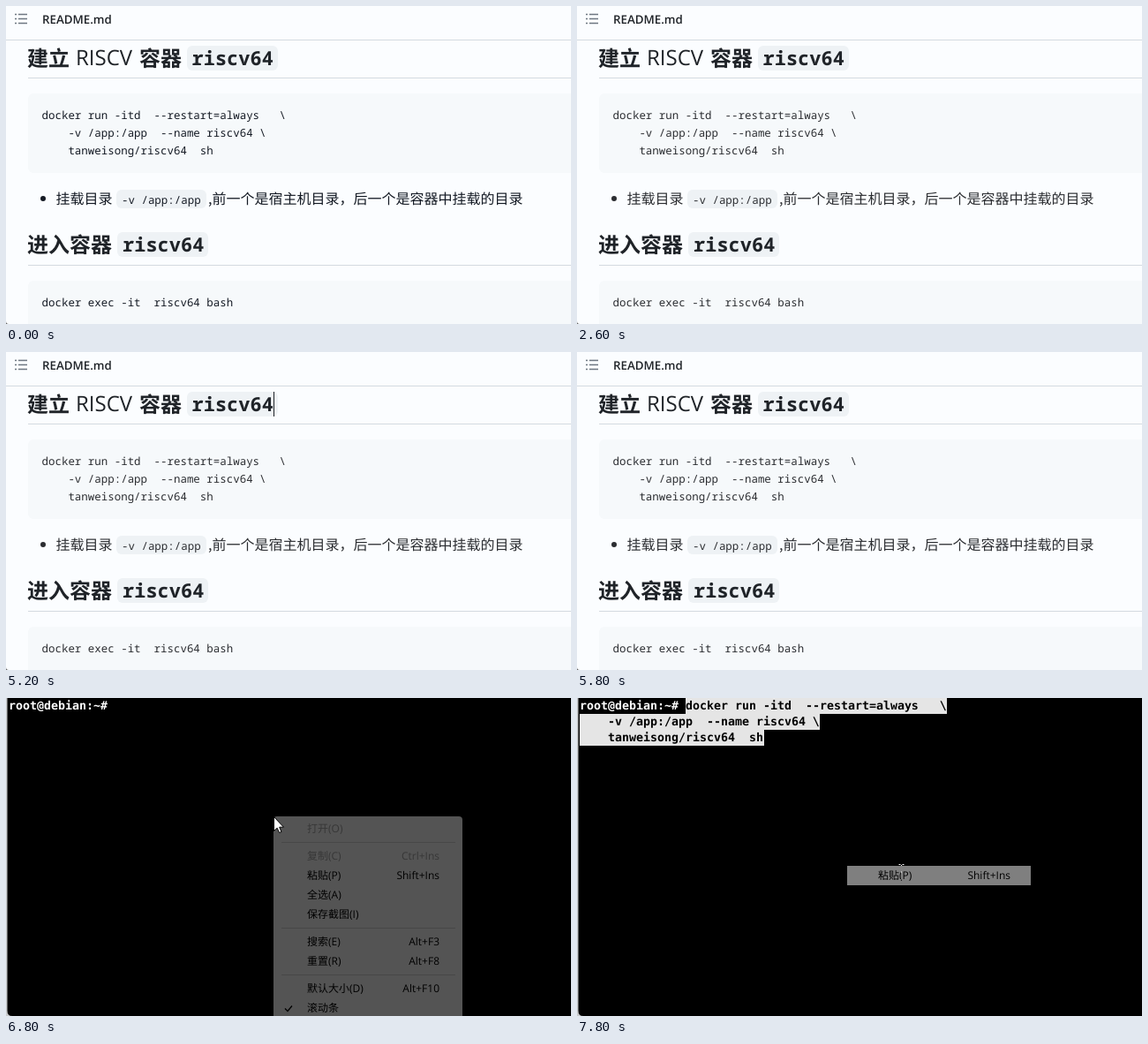
These frames come from a looping animation (640 px wide and 360 px high, 8 s). An HTML page:

```html
<!DOCTYPE html>
<html lang="zh-CN">
<head>
<meta charset="utf-8">
<title>RISCV container notes</title>
<style>
html, body { margin: 0; height: 100%; overflow: hidden; background: #fbfdff; }
svg { display: block; width: 640px; height: 360px; }
text { white-space: pre; text-rendering: geometricPrecision; }
#page { fill: #1f2328; }
.h { font: 700 24px "Noto Sans CJK SC", "Noto Sans CJK", sans-serif; }
.latin { font: 500 24px "Open Sans", sans-serif; }
.hcode { font: 700 22px "Noto Sans Mono", monospace; }
.p { font: 16px "Noto Sans CJK SC", "Noto Sans CJK", sans-serif; }
.code { font: 12.46px "Noto Sans Mono", monospace; }
.pill { fill: #eef2f5; }
.block { fill: #f6f9fb; }
.rule { fill: #d4dae0; }
.term { font: 700 13.29px "DejaVu Sans Mono", monospace; fill: #fff; }
.sel text { fill: #000; }
.sel rect { fill: #e5e5e5; }
.menu { font: 12px "Open Sans", "Noto Sans CJK SC", "Noto Sans CJK", sans-serif; fill: #000; }
.key { text-anchor: end; }
.off { fill: #a0a0a0; }
#beam { mix-blend-mode: difference; }
</style>
</head>
<body>
<svg viewBox="0 0 640 360">
  <g id="page">
    <rect width="640" height="360" fill="#fbfdff"/>
    <path d="M14 9.5H24M14 14.5H24M14 19.5H24M10 9.5h2M10 14.5h2M10 19.5h2" stroke="#6e7781" stroke-width="1.3"/>
    <text x="41" y="20" style="font:600 13.3px 'Open Sans',sans-serif">README.md</text>
    <rect class="rule" y="38" width="640" height="1"/>

    <g id="link" transform="translate(5 50)" fill="none" stroke="#24292f" stroke-width="1.5" stroke-linecap="round">
      <path id="half" d="M8.3 3.8l1.3-1.3a2.75 2.75 0 0 1 3.9 3.9l-2.5 2.5a2.75 2.75 0 0 1-3.9 0"/>
      <use href="#half" transform="rotate(180 8 8)"/>
    </g>
    <text class="h" x="24" y="67.5">建立</text>
    <text class="latin" x="79" y="67">RISCV</text>
    <text class="h" x="151" y="67.5">容器</text>
    <rect class="pill" x="205" y="45" width="103" height="28" rx="6"/>
    <text class="hcode" x="210.5" y="67">riscv64</text>
    <rect class="rule" x="25" y="81" width="615" height="1"/>
    <rect id="caret" x="303" y="45" width="1" height="28"/>

    <rect class="block" x="25" y="99" width="630" height="90" rx="6"/>
    <rect class="block" x="25" y="311" width="630" height="90" rx="6"/>
    <rect class="pill" x="125" y="208" width="102" height="21" rx="6"/>
    <g id="body">
      <g class="code">
        <text x="40.5" y="128">docker run -itd  --restart=always   \</text>
        <text x="40.5" y="148">    -v /app:/app  --name riscv64 \</text>
        <text x="40.5" y="168">    tanweisong/riscv64  sh</text>
        <text x="131" y="224">-v /app:/app</text>
        <text x="40.5" y="340">docker exec -it  riscv64 bash</text>
      </g>
      <circle cx="42" cy="218" r="3"/>
      <text class="p" x="56.5" y="223.5">挂载目录</text>
      <text class="p" x="229" y="223.5">,</text>
      <text class="p" x="233.5" y="223.5">前一个是宿主机目录，后一个是容器中挂载的目录</text>
    </g>

    <text class="h" x="24" y="278.5">进入容器</text>
    <rect class="pill" x="126" y="256" width="103" height="28" rx="6"/>
    <text class="hcode" x="132" y="278">riscv64</text>
    <rect class="rule" x="25" y="293" width="615" height="1"/>
    <path d="M0 357Q0 360 3 360H0z" fill="#555"/>
  </g>

  <g id="shell">
    <rect width="640" height="360" fill="#c8cacc"/>
    <path d="M1.5 0H640V360H7Q1.5 360 1.5 354z"/>
    <text class="term" x="3" y="13">root@debian:~#</text>
    <rect id="prompt" x="123" width="1" height="18" fill="#ddd"/>
    <g id="paste" class="term sel">
      <rect x="123" width="296" height="18"/>
      <rect x="3" y="18" width="272" height="18"/>
      <rect x="3" y="36" width="209" height="18"/>
      <text x="123" y="13">docker run -itd  --restart=always   \</text>
      <text x="3" y="31">    -v /app:/app  --name riscv64 \</text>
      <text x="3" y="49">    tanweisong/riscv64  sh</text>
    </g>
    <g id="menu" class="menu">
      <rect x="303" y="134" width="214" height="250" rx="4" fill="#f5f5f5"/>
      <rect id="hover" x="306" y="190" width="208" height="22" fill="#e8e8e8"/>
      <path d="M312 163.5H509M312 260.5H509M312 313.5H509" stroke="#d0d0d0"/>
      <path d="M316 351.5l3 3 5-6" fill="none" stroke="#000" stroke-width="1.2"/>
      <g id="items"></g>
    </g>
    <g id="flash" class="menu" opacity=".55">
      <rect x="306" y="190" width="208" height="22" fill="#e8e8e8"/>
      <text x="341" y="205">粘贴(P)</text>
      <text class="key" x="491" y="205">Shift+Ins</text>
    </g>
  </g>

  <path id="arrow" d="M.5 .5V16.5L4.2 13.2 6.6 18.5 9 17.5 6.7 12.2H11.5z" fill="#fff" stroke="#000"/>
  <path id="beam" d="M-3 -8.5H-1M1 -8.5H3M-3 8.5H-1M1 8.5H3M0 -8V8" fill="none" stroke="#fff"/>
</svg>
<script>
const $ = id => document.getElementById(id);

// [baseline, label, shortcut, disabled]
$('items').innerHTML = [
  [152, '打开(O)', '', 1],
  [183, '复制(C)', 'Ctrl+Ins', 1],
  [205, '粘贴(P)', 'Shift+Ins'],
  [227, '全选(A)', ''],
  [249, '保存截图(I)', ''],
  [280, '搜索(E)', 'Alt+F3'],
  [302, '重置(R)', 'Alt+F8'],
  [333, '默认大小(D)', 'Alt+F10'],
  [355, '滚动条', '']
].map(([y, label, key, off]) =>
  `<g class="${off ? 'off' : ''}"><text x="341" y="${y}">${label}</text>` +
  `<text class="key" x="491" y="${y}">${key}</text></g>`).join('');

// [time, pointer, x, y]; each pose holds until the next
const pointer = [
  [0], [600, 'arrow', 368, 53], [800, 'arrow', 390, 57],
  [1600, 'arrow', 404, 66], [1800],
  [3200, 'arrow', 321, 282], [3400, 'beam', 308, 230], [3600, 'beam', 290, 217],
  [3800, 'beam', 277, 205], [4000, 'arrow', 289, 182], [4200, 'arrow', 302, 174], [4400],
  [6400, 'beam', 310, 150], [6600, 'beam', 303, 134], [6800, 'arrow', 303, 134],
  [7200, 'arrow', 354, 204], [7400, 'arrow', 357, 198], [7800, 'beam', 367.5, 197]
];
const caretOn = [[1000, 1600], [2000, 2600], [3200, 3600], [4400, 4600], [5200, 5800]];

const show = (id, on) => $(id).style.display = on ? '' : 'none';
const within = (t, a, b) => t >= a && t < b;

function draw(t) {
  show('page', t < 6200);
  show('link', within(t, 600, 2000));
  show('caret', caretOn.some(([a, b]) => within(t, a, b)));
  $('body').setAttribute('fill', t < 400 ? '#141a24' : '#2b2d31');

  show('shell', t >= 6200);
  show('prompt', t < 6600);
  show('menu', within(t, 6800, 7800));
  $('menu').setAttribute('opacity', t < 7000 ? .34 : 1);
  show('hover', t >= 7200);
  show('paste', t >= 7800);
  show('flash', t >= 7800);

  const [, kind, x, y] = pointer.findLast(p => p[0] <= t);
  for (const id of ['arrow', 'beam']) show(id, id === kind);
  if (kind) $(kind).setAttribute('transform', `translate(${x} ${y})`);
}

function tick() {
  draw(performance.now() % 8000);
  requestAnimationFrame(tick);
}
tick();
</script>
</body>
</html>
```
